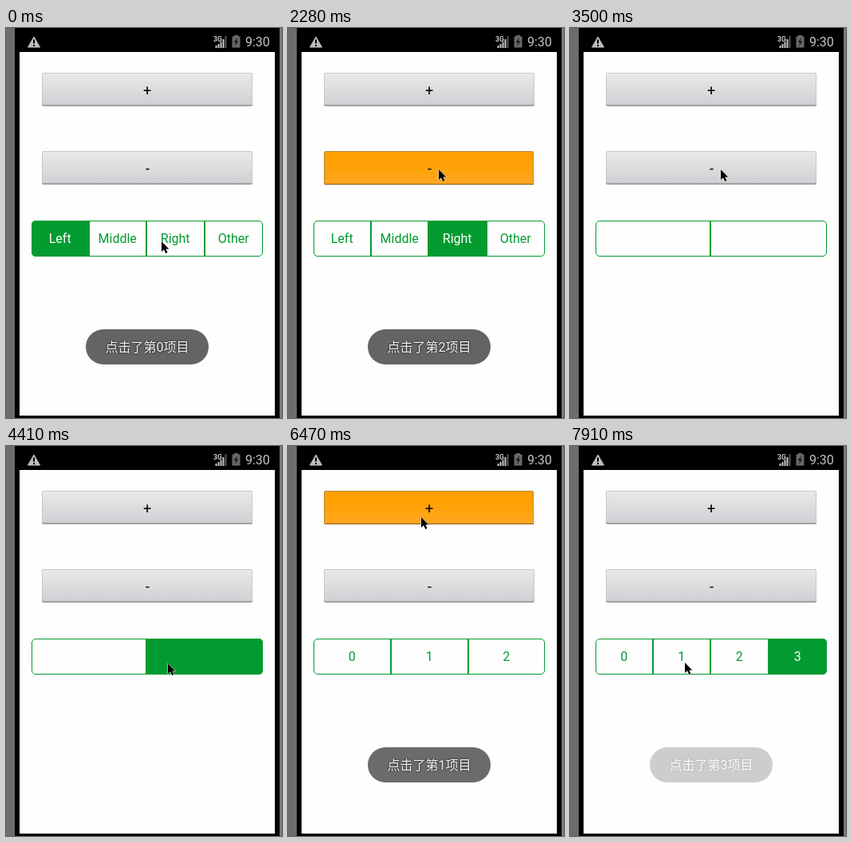
An HTML page for the animation above (8 s loop, 346 by 488 pixels).

```html
<!DOCTYPE html>
<html lang="en">
<head>
<meta charset="utf-8">
<title>Segmented control demo</title>
<style>
html, body { margin: 0; width: 100%; height: 100%; overflow: hidden; background: #000; }
svg { display: block; width: 100%; height: 100%; }
text { font: 16px Roboto, "Noto Sans CJK SC", "Noto Sans CJK", sans-serif; }
.mid { text-anchor: middle; }
.toast text { fill: #f4f4f4; text-shadow: 0 0 2.5px #000; }

/* Everything shares one 8 s clock; values hold until the next key. */
.anim { animation: 8s step-end infinite; }
#cursor { animation-name: cursor; }
#plusDown { animation-name: plus-down; }
#minusDown { animation-name: minus-down; }
#toast0 { animation-name: toast0; }
#toast1 { animation-name: toast1; }
#toast2 { animation-name: toast2; }
#toast3 { animation-name: toast3; }
#namesLeft { animation-name: names-left; }
#namesRight { animation-name: names-right; }
#three { animation-name: three; }
#two { animation-name: two; }
#twoRight { animation-name: two-right; }
#four { animation-name: four; }
#fourLast { animation-name: four-last; }

@keyframes cursor {
  0% { transform: translate(195px, 267px); }
  1.875% { transform: translate(204px, 265px); }
  18.375% { transform: translate(204px, 265px); animation-timing-function: steps(5); }
  26.5% { transform: translate(189px, 177px); }
  45.125% { transform: translate(189px, 177px); animation-timing-function: steps(4); }
  53.125% { transform: translate(203px, 272px); }
  59.125% { transform: translate(203px, 272px); animation-timing-function: steps(4); }
  65.625% { transform: translate(160px, 198px); }
  65.8125% { transform: translate(160px, 198px); animation-timing-function: steps(3); }
  70.875% { transform: translate(167px, 89px); }
  84.0625% { transform: translate(167px, 89px); animation-timing-function: steps(5); }
  92.375% { transform: translate(280px, 266px); }
  95.875% { transform: translate(280px, 266px); animation-timing-function: steps(2); }
  98.875%, 100% { transform: translate(144px, 271px); }
}
@keyframes minus-down {
  0%, 31.875%, 43.75%, 100% { opacity: 0; }
  28.5%, 40.25% { opacity: 1; }
}
@keyframes plus-down {
  0%, 75.625%, 84%, 100% { opacity: 0; }
  72.5%, 80.875% { opacity: 1; }
}
@keyframes toast0 {
  0% { opacity: 1; }
  13.5% { opacity: .96; }
  15.125% { opacity: .72; }
  16.75% { opacity: .28; }
  18.375%, 100% { opacity: 0; }
}
@keyframes toast2 {
  0%, 41.875%, 100% { opacity: 0; }
  13.5% { opacity: .36; }
  15.125% { opacity: .77; }
  16.75% { opacity: .98; }
  18.375% { opacity: 1; }
  37% { opacity: .97; }
  38.75% { opacity: .73; }
  40.25% { opacity: .33; }
}
@keyframes toast1 {
  0%, 85.75%, 100% { opacity: 0; }
  56.875% { opacity: .45; }
  58.875% { opacity: .88; }
  60.75% { opacity: 1; }
  80.875% { opacity: .95; }
  82.375% { opacity: .72; }
  84% { opacity: .28; }
}
@keyframes toast3 {
  0% { opacity: 0; }
  98.875%, 100% { opacity: .32; }
}
@keyframes names-left {
  0% { opacity: 1; }
  5.75%, 100% { opacity: 0; }
}
@keyframes names-right {
  0%, 31.875%, 100% { opacity: 0; }
  5.75% { opacity: 1; }
}
@keyframes three {
  0%, 43.75%, 84%, 100% { opacity: 0; }
  31.875%, 75.625% { opacity: 1; }
}
@keyframes two {
  0%, 55.125%, 100% { opacity: 0; }
  43.75% { opacity: 1; }
}
@keyframes two-right {
  0%, 75.625%, 100% { opacity: 0; }
  55.125% { opacity: 1; }
}
@keyframes four {
  0%, 95.875%, 100% { opacity: 0; }
  84% { opacity: 1; }
}
@keyframes four-last {
  0% { opacity: 0; }
  95.875%, 100% { opacity: 1; }
}
</style>
</head>
<body>
<svg viewBox="0 0 346 488">
  <defs>
    <linearGradient id="idle" x2="0" y2="1">
      <stop offset="0" stop-color="#ebe8ea"/>
      <stop offset=".45" stop-color="#e0dde0"/>
      <stop offset="1" stop-color="#d1cfd3"/>
    </linearGradient>
    <linearGradient id="pressed" x2="0" y2="1">
      <stop offset="0" stop-color="#ff9f00"/>
      <stop offset=".5" stop-color="#ffa208"/>
      <stop offset="1" stop-color="#ffa724"/>
    </linearGradient>
    <clipPath id="barShape"><rect x="32" y="241" width="290" height="45" rx="5"/></clipPath>
    <g id="button">
      <rect x="45" y="1" width="264" height="41" rx="2" fill="#a3a1a4"/>
      <rect x="45" width="264" height="40" rx="2" fill="#c9c7ca"/>
      <rect x="46" y="1" width="262" height="39" rx="1" fill="url(#idle)"/>
    </g>
    <g id="buttonDown">
      <rect x="45" width="264" height="42" fill="#fefefe"/>
      <rect x="45.5" y=".5" width="262" height="41" rx="1" fill="url(#pressed)" stroke="#b98a3c"/>
      <path d="M46 41.5H308" stroke="#8a5a10"/>
    </g>
  </defs>

  <rect width="346" height="488" fill="#000"/>
  <rect width="11" height="488" fill="#6c6c6c"/>
  <rect x="343" width="3" height="488" fill="#7a7a7a"/>
  <rect x="17" y="30" width="320" height="455" fill="#fefefe"/>

  <g id="status">
    <path d="M35 11L42.500 24H27.500Z" fill="#bdbdbd" stroke="#bdbdbd" stroke-linejoin="round"/>
    <path d="M35 14.500V19.500M35 21V23" stroke="#000" stroke-width="2"/>
    <text x="260" y="16.500" fill="#d0d0d0" style="font-size:8.500px;font-weight:700">3G</text>
    <path d="M263.500 25V22M266.500 25V20M269.500 25V17.500M272.500 25V14" stroke="#c8c8c8" stroke-width="2"/>
    <path d="M275.500 25V10" stroke="#555" stroke-width="2"/>
    <path d="M286 9H291V10.500H293.500V24.500H283.500V10.500H286Z" fill="#686868"/>
    <path d="M290 12L285.500 18H288L287 23L291.500 16.500H289Z" fill="#1c1c1c"/>
    <text x="300" y="23" fill="#c4c4c4">9:30</text>
  </g>

  <g transform="translate(0 56)">
    <use href="#button"/>
    <use href="#buttonDown" id="plusDown" class="anim"/>
    <text x="177" y="27.500" class="mid" style="font-size:18px">+</text>
  </g>
  <g transform="translate(0 154)">
    <use href="#button"/>
    <use href="#buttonDown" id="minusDown" class="anim"/>
    <text x="177.500" y="27.500" class="mid" style="font-size:18px">-</text>
  </g>

  <g id="bars"></g>
  <g id="toasts"></g>

  <path id="cursor" class="anim" d="M0 0V13L3 10.300L5.300 15L7.500 14L5.300 9.500H9.300Z"
        fill="#000" stroke="#fff" paint-order="stroke"/>
</svg>
<script>
const GREEN = "#029b30";
const LEFT = 32, RIGHT = 322;
// Left edges of the two-pixel dividers, by number of segments.
const CUTS = { 2: [175], 3: [128, 225], 4: [103, 175, 248] };

function bar(id, labels, selected = -1) {
  const cuts = CUTS[labels.length];
  const cells = labels.map((label, i) => {
    const start = i ? cuts[i - 1] + 1 : LEFT;
    const end = i < cuts.length ? cuts[i] + 1 : RIGHT;
    const on = i === selected;
    const fill = on ? `<rect x="${start}" y="241" width="${end - start}" height="45" fill="${GREEN}"/>` : "";
    return `${fill}<text class="mid" x="${(start + end) / 2 - .3}" y="269" fill="${on ? "#fff" : GREEN}">${label}</text>`;
  });
  const dividers = cuts.map(x => `<rect x="${x}" y="241" width="2" height="45" fill="${GREEN}"/>`);
  return `<g id="${id}" class="anim">
    <g clip-path="url(#barShape)">${cells.join("")}${dividers.join("")}</g>
    <rect x="32.5" y="241.5" width="289" height="44" rx="4.5" fill="none" stroke="${GREEN}"/></g>`;
}

function toast(n) {
  return `<g id="toast${n}" class="toast anim">
    <rect x="100" y="377" width="154" height="44" rx="22" fill="#646464"/>
    <text class="mid" x="177" y="405">点击了第${n}项目</text></g>`;
}

const names = ["Left", "Middle", "Right", "Other"];
const numbers = [0, 1, 2, 3];
document.getElementById("bars").innerHTML = [
  bar("namesLeft", names, 0),
  bar("namesRight", names, 2),
  bar("three", numbers.slice(0, 3)),
  bar("two", ["", ""]),
  bar("twoRight", ["", ""], 1),
  bar("four", numbers),
  bar("fourLast", numbers, 3)
].join("");
document.getElementById("toasts").innerHTML = numbers.map(toast).join("");
</script>
</body>
</html>
```
